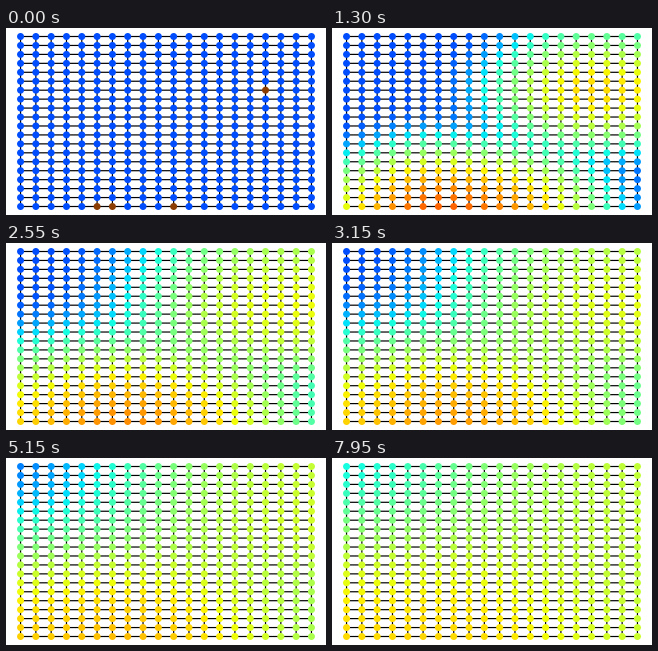
A matplotlib script that plays this animation: 320 px wide and 187 px high, repeating every 8 s.

```python
import numpy as np
import matplotlib.pyplot as plt
from matplotlib.animation import FuncAnimation
from matplotlib.collections import LineCollection

W, H, DPI = 320, 187, 100
N = 20                # nodes per side
FRAMES, STEP = 160, 50
RATE = 0.125          # share of the difference passed along an edge per step
FLOOR, GAIN = 1e-4, 0.2
SEEDS = [(6, 16), (19, 5), (19, 6), (19, 10)]   # row, column
HOT = (0.55, 0.24, 0.0, 1.0)
PX = 72 / DPI


def diffuse(heat):
    p = np.pad(heat, 1, mode="edge")
    around = p[:-2, 1:-1] + p[2:, 1:-1] + p[1:-1, :-2] + p[1:-1, 2:]
    return heat + RATE * (around - 4 * heat)


def shade(heat):
    level = 1 + GAIN * np.log10(heat.ravel() + FLOOR)
    colors = plt.cm.jet(np.clip(level, 0, 1))
    colors[level > 0.97] = HOT
    return colors


heat = np.zeros((N, N))
for cell in SEEDS:
    heat[cell] = 1
states = [heat]
for _ in range(FRAMES - 1):
    states.append(diffuse(states[-1]))

fig = plt.figure(figsize=(W / DPI, H / DPI), dpi=DPI, facecolor="white")
ax = fig.add_axes([0, 0, 1, 1])
ax.set_xlim(0, W)
ax.set_ylim(H, 0)
ax.axis("off")

# a margin of 1/22 on every side
xs = np.linspace(W / 22, W * 21 / 22, N)
ys = np.linspace(H / 22, H * 21 / 22, N)
edges = [[(a, y), (b, y)] for y in ys for a, b in zip(xs, xs[1:])]
edges += [[(x, a), (x, b)] for x in xs for a, b in zip(ys, ys[1:])]
lines = LineCollection(edges, colors="black", linewidths=1.2 * PX, zorder=1)
lines.set_snap(False)
ax.add_collection(lines)

gx, gy = np.meshgrid(xs, ys)
nodes = ax.scatter(gx.ravel(), gy.ravel(), s=(7 * PX) ** 2,
                   c=shade(states[0]), linewidths=0, zorder=2)


def draw(i):
    nodes.set_facecolor(shade(states[i]))
    return [nodes]


anim = FuncAnimation(fig, draw, frames=FRAMES, interval=STEP,
                     repeat=True, repeat_delay=0, blit=False)
plt.show()
```
